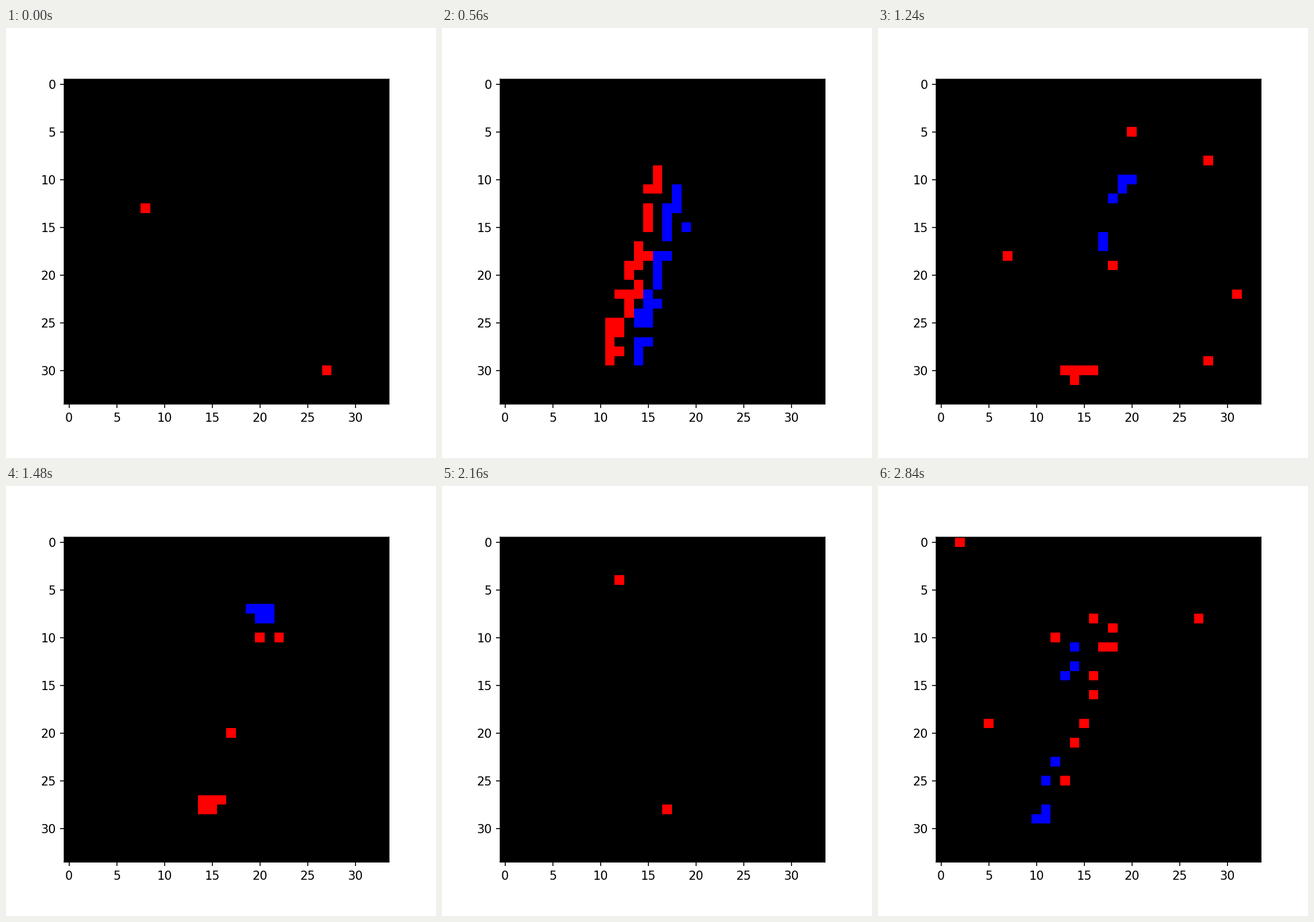
Animation, 748 px wide and 748 px high, one loop 2.88 s. Source, as a matplotlib script:

```python
import matplotlib.pyplot as plt
import numpy as np
from matplotlib.animation import FuncAnimation

SIZE, DPI = 748, 150
GRID, FRAMES, STEP = 34, 72, 40
RED, BLUE = (255, 0, 0), (0, 0, 255)

# The sensor sweeps a triangle, so the stroke visits three corners
CORNERS = np.array([(13.6, 18.5), (16.5, 20.7), (18.2, 13.4)])
SWEEPS = [(3, 28), (28, 47), (55, 72)]   # first and last step of each sweep
HALF = np.array([2.3, -9.0])             # stroke centre to its upper tip
RADIUS, SOFT, GAIN = 1.2, 0.3, 6.0
NOISE, NOISE_RED = 1.6, 0.92             # specks per step, share of red

rows, cols = np.mgrid[0:GRID, 0:GRID]


def centre(t):
    """Stroke centre at time t, easing in and out of each corner."""
    pos = CORNERS[0]
    for k, (start, end) in enumerate(SWEEPS):
        u = np.clip((t - start) / (end - start), 0, 1)
        leg = CORNERS[(k + 1) % 3] - CORNERS[k]
        pos = pos + leg * u * u * (3 - 2 * u)
    return pos


def brightness(pos):
    """Soft image of a slanted stroke centred at pos."""
    x, y = cols - pos[0], rows - pos[1]
    along = np.clip((x * HALF[0] + y * HALF[1]) / (HALF @ HALF), -1, 1)
    dist = np.hypot(x - along * HALF[0], y - along * HALF[1])
    return 1 / (1 + np.exp((dist - RADIUS) / SOFT))


def events(i):
    """Blue where the stroke arrives, red where it leaves, plus noise."""
    rng = np.random.default_rng(100 + i)
    change = GAIN * (brightness(centre(i + 0.5)) - brightness(centre(i - 0.5)))
    fired = rng.random((GRID, GRID)) < np.abs(change)
    sign = np.where(fired, np.sign(change), 0)
    for x, y in rng.integers(0, GRID, (rng.poisson(NOISE), 2)):
        sign[y, x] = -1 if rng.random() < NOISE_RED else 1
    img = np.zeros((GRID, GRID, 3), np.uint8)
    img[sign < 0] = RED
    img[sign > 0] = BLUE
    return img


fig = plt.figure(figsize=(SIZE / DPI, SIZE / DPI), dpi=DPI, facecolor="white")
ax = fig.add_axes([101.3 / SIZE, 93.9 / SIZE, 564.9 / SIZE, 564.9 / SIZE])
view = ax.imshow(events(0), aspect="auto", interpolation="nearest")
ax.set_xticks(range(0, 31, 5))
ax.set_yticks(range(0, 31, 5))
ax.tick_params(labelsize=10, labelfontfamily="DejaVu Sans")
for spine in ax.spines.values():
    spine.set_snap(False)


def update(i):
    view.set_data(events(i))
    return [view]


anim = FuncAnimation(fig, update, frames=FRAMES, interval=STEP,
                     repeat=True, repeat_delay=0, blit=False)
plt.show()
```
